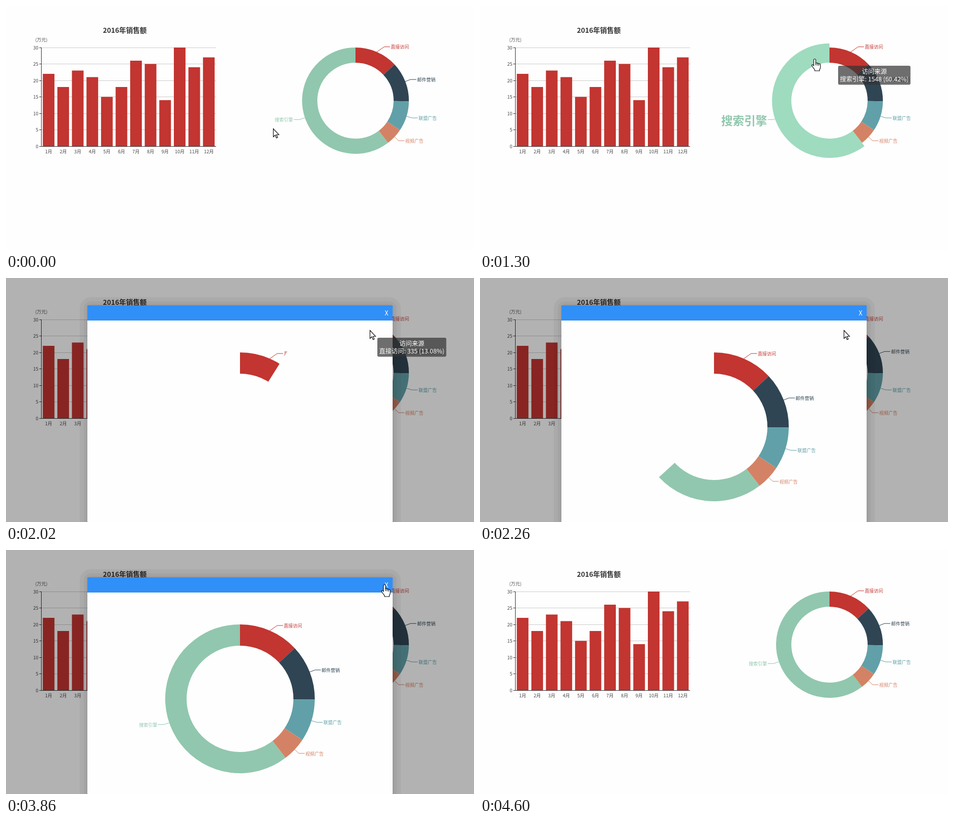
An HTML page with a canvas for the animation above (5 s loop, 920 by 482 pixels).

```html
<!DOCTYPE html>
<html lang="zh-CN">
<head>
<meta charset="utf-8">
<style>
  html, body { margin: 0; width: 100%; height: 100%; overflow: hidden; background: #fefefe; }
  canvas { display: block; }
</style>
</head>
<body>
<canvas id="stage" width="920" height="482"></canvas>
<script>
const ctx = document.getElementById('stage').getContext('2d');
const LOOP = 5000, TAU = Math.PI * 2;
const FONT = '"Noto Sans CJK SC", "Noto Sans CJK", "Noto Sans", sans-serif';
const SALES = [22, 18, 23, 21, 15, 18, 26, 25, 14, 30, 24, 27];
const SOURCES = [
  { name: '直接访问', value: 335, color: '#c23531', lifted: '#d53a36' },
  { name: '邮件营销', value: 310, color: '#2f4554', lifted: '#344c5c' },
  { name: '联盟广告', value: 234, color: '#61a0a8', lifted: '#6bb0b9' },
  { name: '视频广告', value: 135, color: '#d48265', lifted: '#e98f6f' },
  { name: '搜索引擎', value: 1548, color: '#91c7ae', lifted: '#9fdbbf' }
];
const TOTAL = SOURCES.reduce((sum, s) => sum + s.value, 0);
const MODAL = { open: 1900, close: 4180, growFrom: 1991, growTime: 950 };

// time, cursor x, y, cursor shape, then tooltip source, x, y
const STEPS = [
  [0, 525, 242, 'arrow'],
  [280, 521, 232, 'arrow'],
  [400, 583, 129, 'arrow'],
  [550, 606, 122, 'hand', 4, 619, 138],
  [700, 692, 105, 'hand', 0, 682, 130],
  [820, 704, 104, 'hand', 0, 708, 121],
  [940, 715, 103, 'hand', 0, 730, 118],
  [1300, 658, 104, 'hand', 4, 704, 118],
  [1420, 655, 104, 'hand', 4, 676, 118],
  [1660, 700, 103, 'hand', 0, 700, 118],
  [1780, 715, 103, 'hand', 0, 728, 118],
  [1900, 715, 103, 'arrow', 0, 730, 118],
  [2020, 715, 103, 'arrow', 0, 730, 118],
  [2140, 715, 103, 'arrow'],
  [2260, 715, 103, 'arrow'],
  [2410, 712, 104, 'arrow'],
  [2530, 712, 104, 'arrow'],
  [2650, 710, 104, 'arrow'],
  [2770, 710, 104, 'arrow'],
  [2920, 706, 106, 'arrow'],
  [3040, 703, 107, 'arrow'],
  [3320, 726, 80, 'arrow'],
  [3460, 736, 68, 'arrow'],
  [3710, 743, 68, 'arrow'],
  [3860, 744, 68, 'hand'],
  [4180, 744, 68, 'arrow'],
  [4320, 748, 252, 'hand', 3, 754, 160],
  [4440, 711, 381, 'arrow', 3, 754, 160],
  [4600, 0, 0, 'none']
];

const CURSORS = {
  arrow: new Path2D('M.5 .5V16.5L4.2 13L6.6 18.8L9 17.8L6.6 12.2H11.5Z'),
  hand: new Path2D('M-2 2Q0 -1 2 2V9Q3.6 7.2 5 9.4Q6.8 8 8 10.4Q10.4 9 11.3 12V17Q11.2 19.5 9.5 21.5V24' +
    'H0V22L-5 15Q-7 11.5 -3.6 12L-2 14Z M2 9V13M5 9.5V13.5M8 10.5V14')
};

function rect(x, y, w, h, color, radius = 0) {
  ctx.fillStyle = color;
  ctx.beginPath();
  ctx.roundRect(x, y, w, h, radius);
  ctx.fill();
}

function line(points, color) {
  ctx.strokeStyle = color;
  ctx.lineWidth = 1;
  ctx.beginPath();
  points.forEach(([x, y]) => ctx.lineTo(x, y));
  ctx.stroke();
}

// y is the vertical centre of the glyphs
function text(str, x, y, size, color, align = 'center', weight = 400) {
  ctx.font = `${weight} ${size}px ${FONT}`;
  ctx.textAlign = align;
  ctx.fillStyle = color;
  ctx.fillText(str, x, y + size * 0.37);
}

function drawBars() {
  const left = 69.5, right = 413, base = 277, unit = 6.5;
  const slot = (right - left) / SALES.length;
  text('2016年销售额', 233.5, 48, 13.5, '#333', 'center', 700);
  text('(万元)', left, 67, 9, '#555');
  for (let v = 0; v <= 30; v += 5) {
    const y = Math.floor(base - v * unit) + 0.5;
    if (v) line([[left, y], [right, y]], '#ccc');
    line([[left - 4, y], [left, y]], '#333');
    text(v, 63.5, y + 0.5, 9, '#444', 'right');
  }
  SALES.forEach((v, i) => {
    const x = left + slot * i;
    rect(x + slot * 0.1, base - v * unit, slot * 0.8, v * unit, '#c23531');
    text(`${i + 1}月`, x + slot / 2, 288, 9, '#444');
  });
  line([[left, 82], [left, base + 0.5], [right, base + 0.5]], '#333');
}

function drawDonut(cx, cy, inner, outer, hovered) {
  let angle = 0;
  SOURCES.forEach((s, i) => {
    const start = angle, active = i === hovered;
    angle += s.value / TOTAL * TAU;
    const mid = (start + angle) / 2, dx = Math.sin(mid), dy = -Math.cos(mid);
    const side = Math.sign(dx);
    const elbowX = cx + dx * (outer + 11) + (i ? 0 : 10);
    const elbowY = cy + dy * (outer + 11);
    const endX = elbowX + side * 11.5;
    line([[cx + dx * outer, cy + dy * outer], [elbowX, elbowY], [endX, elbowY]], s.color);
    text(s.name, endX + side * 1.5, elbowY + (active ? 2 : 0.5), active ? 22.5 : 9, s.color,
      side > 0 ? 'left' : 'right', active ? 700 : 400);
    ctx.fillStyle = active ? s.lifted : s.color;
    ctx.beginPath();
    ctx.arc(cx, cy, outer + (active ? 8 : 0), start - TAU / 4, angle - TAU / 4);
    ctx.arc(cx, cy, inner, angle - TAU / 4, start - TAU / 4, true);
    ctx.fill();
  });
}

function drawModal(t) {
  rect(0, 0, 920, 482, 'rgba(0,0,0,.3)');
  for (const spread of [16, 8, 3]) {
    rect(161 - spread, 54 - spread, 599 + spread * 2, 500, 'rgba(0,0,0,.045)', spread + 6);
  }
  rect(160, 54, 600, 428, '#fefefe');
  rect(160, 54, 600, 30, '#318ff8');
  text('X', 748, 69, 12.5, '#fff', 'center', 500);

  const p = Math.min(1, Math.max(0, (t - MODAL.growFrom) / MODAL.growTime));
  const sweep = TAU * (1 - (1 - p) ** 3);
  ctx.save();
  ctx.beginPath();
  ctx.moveTo(460, 294);
  ctx.arc(460, 294, 400, -TAU / 4, sweep - TAU / 4);
  ctx.clip();
  drawDonut(460, 294, 105, 147);
  ctx.restore();
}

function drawTooltip(index, x, y) {
  const { name, value } = SOURCES[index], size = 12.25;
  const detail = `${name}: ${value} (${(value / TOTAL * 100).toFixed(2)}%)`;
  ctx.font = `400 ${size}px ${FONT}`;
  const width = ctx.measureText(detail).width + 7;
  rect(x, y, width, 37.5, 'rgba(50,50,50,.7)', 3);
  text('访问来源', x + width / 2, y + 11.5, size, '#fff');
  text(detail, x + width / 2, y + 26.5, size, '#fff');
}

function drawCursor(shape, x, y) {
  const path = CURSORS[shape];
  if (!path) return;
  ctx.save();
  ctx.translate(x, y);
  ctx.fillStyle = '#fff';
  ctx.strokeStyle = '#000';
  ctx.lineWidth = 1.1;
  ctx.fill(path);
  ctx.stroke(path);
  ctx.restore();
}

function draw(now) {
  const time = now % LOOP;
  const [t, x, y, shape, tip, tipX, tipY] = STEPS.findLast(step => step[0] <= time);
  const modal = t >= MODAL.open && t < MODAL.close;
  rect(0, 0, 920, 482, '#fefefe');
  drawBars();
  drawDonut(687, 187, 75, 105, modal ? undefined : tip);
  if (modal) drawModal(t);
  if (tip !== undefined) drawTooltip(tip, tipX, tipY);
  drawCursor(shape, x, y);
}

const began = performance.now();
function tick() {
  draw(performance.now() - began);
  requestAnimationFrame(tick);
}
tick();
</script>
</body>
</html>
```
